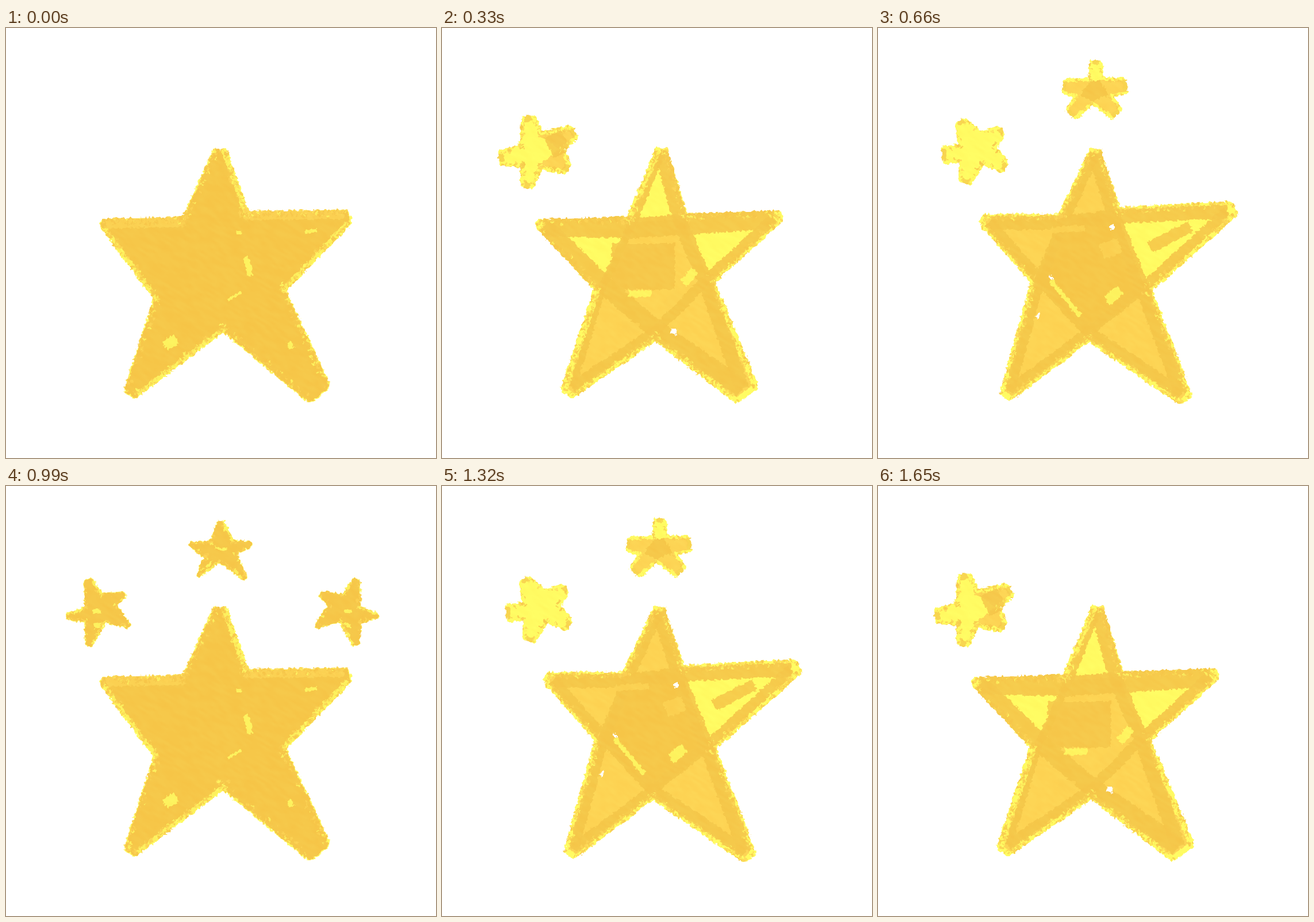
Animation, 748 px wide and 748 px high, one loop 1.98 s. Source, as an HTML page with a canvas:

```html
<!DOCTYPE html>
<html lang="en">
<head>
<meta charset="utf-8">
<title>Crayon stars</title>
<style>
html, body { margin: 0; width: 100%; height: 100%; overflow: hidden; background: #fff; }
canvas { display: block; width: 100vmin; height: 100vmin; }
</style>
</head>
<body>
<canvas id="stage" width="748" height="748"></canvas>
<script>
const start = performance.now();
const SIZE = 748, HOLD = 330, MIRROR = 753;
const YELLOW = '#fffb62', AMBER = '#fdd454', GOLD = '#f6c749', WHITE = '#fff';
const ORDER = [0, 1, 2, 3, 2, 1];

let seed = 1;
function rnd() {
  seed = (seed * 1664525 + 1013904223) >>> 0;
  return seed / 4294967296;
}

// Smooth value noise in -1..1 on a wrapped lattice
function makeNoise(cw, ch = cw) {
  const grid = Float32Array.from({ length: 65536 }, () => rnd() * 2 - 1);
  const at = (a, b) => grid[((b & 255) << 8) | (a & 255)];
  return (x, y) => {
    x /= cw; y /= ch;
    const i = Math.floor(x), j = Math.floor(y), u = x - i, v = y - j;
    const top = at(i, j) + (at(i + 1, j) - at(i, j)) * u;
    const low = at(i, j + 1) + (at(i + 1, j + 1) - at(i, j + 1)) * u;
    return top + (low - top) * v;
  };
}
const shiftX = makeNoise(3), shiftY = makeNoise(3), streak = makeNoise(14, 5);

let g;

function trace(pts) {
  g.beginPath();
  pts.forEach(p => g.lineTo(p[0], p[1]));
}
function area(pts, color, alpha = 1) {
  g.globalAlpha = alpha;
  g.fillStyle = color;
  trace(pts);
  g.fill();
}
function line(pts, width, color, alpha = 1) {
  g.globalAlpha = alpha;
  g.strokeStyle = color;
  g.lineWidth = width;
  trace(pts);
  g.stroke();
}
function blob(pts, grow, color) {
  area(pts.concat([pts[0]]), color);
  line(pts.concat([pts[0], pts[1]]), grow * 2, color);
}
function mark([x, y, length, width, deg], color, alpha) {
  const a = deg * Math.PI / 180, dx = Math.cos(a) * length / 2, dy = Math.sin(a) * length / 2;
  line([[x - dx, y - dy], [x + dx, y + dy]], width, color, alpha);
}

const toward = (p, q, d) => {
  const n = Math.hypot(q[0] - p[0], q[1] - p[1]);
  return [p[0] + (q[0] - p[0]) * d / n, p[1] + (q[1] - p[1]) * d / n];
};

// Tips [x, y, half width] and dents run clockwise from the top; r rounds every corner
function shape(r, tips, dents) {
  const mid = [0, 1].map(k => dents.reduce((sum, p) => sum + p[k], 0) / 5);
  const ends = tips.map(([x, y, w = 0]) => {
    const n = Math.hypot(x - mid[0], y - mid[1]);
    const px = (mid[1] - y) / n * w, py = (x - mid[0]) / n * w;
    return [[x - px, y - py], [x + px, y + py]];
  });
  const sides = ends.flatMap((e, i) => [[e[1], dents[i]], [dents[i], ends[(i + 1) % 5][0]]]);
  return { r, tips, dents, mid, ends, sides, outline: ends.flatMap((e, i) => [...e, dents[i]]) };
}

// Point on one side, moved outwards by d
function rim([a, b], t, d) {
  const dx = b[0] - a[0], dy = b[1] - a[1], n = Math.hypot(dx, dy);
  return [a[0] + dx * t + dy / n * d, a[1] + dy * t - dx / n * d];
}

function grains(s, density) {
  g.globalAlpha = 0.75;
  for (const side of s.sides) {
    const n = Math.hypot(side[1][0] - side[0][0], side[1][1] - side[0][1]) * density;
    for (let k = 0; k < n; k++) {
      const [x, y] = rim(side, rnd() * 1.1 - 0.05, s.r * (1.1 - rnd() * 1.2));
      const pick = rnd(), size = 0.7 + rnd() * 1.6;
      g.fillStyle = pick < 0.6 ? GOLD : pick < 0.85 ? AMBER : YELLOW;
      g.beginPath();
      g.ellipse(x, y, size * 1.4, size, rnd() * 3, 0, 7);
      g.fill();
    }
  }
}

function crayon(s, { skin, core, arms = [], chords = [], edges = [], marks = [], holes = [], dab = 0, grit = 0.8 }) {
  g.globalCompositeOperation = 'source-over';
  blob(s.outline, s.r, YELLOW);
  g.globalCompositeOperation = 'source-atop';
  if (skin) blob(s.outline, s.r - skin, GOLD);
  arms.forEach((color, i) => color && area([s.dents[(i + 4) % 5], ...s.ends[i], s.dents[i]], color));
  if (core) area(s.dents, core);
  // Each chord joins a tip to the next but one, past two dents
  chords.forEach((width, i) => {
    const a = s.tips[i], b = s.tips[(i + 2) % 5];
    const path = [toward(a, s.mid, s.r * 0.6), toward(s.dents[i], s.mid, width * 0.3),
      toward(s.dents[(i + 1) % 5], s.mid, width * 0.3), toward(b, s.mid, s.r * 0.6)];
    line(path, width, GOLD, 0.9);
  });
  edges.forEach(([i, width, color]) => line([0, 1].map(t => rim(s.sides[i], t, s.r * 0.6)), width, color, 0.8));
  marks.forEach(([color, ...m]) => mark(m, color, 0.85));
  if (dab) s.ends.forEach(e => line(e.map(p => toward(p, s.mid, -s.r * 0.5)), dab, GOLD, 0.7));
  grains(s, grit);
  holes.forEach(m => mark(m, WHITE, 1));
}

// Ragged contours and faint wax streaks
function roughen() {
  const src = g.getImageData(0, 0, SIZE, SIZE), out = g.createImageData(SIZE, SIZE);
  const a = src.data, b = out.data;
  const clamp = v => Math.max(0, Math.min(SIZE - 1, Math.round(v)));
  for (let y = 0, o = 0; y < SIZE; y++) {
    for (let x = 0; x < SIZE; x++, o += 4) {
      const i = (clamp(y + shiftY(x, y) * 2.4) * SIZE + clamp(x + shiftX(x, y) * 2.4)) * 4;
      const tint = a[i + 2] < 200 ? streak(x + y * 0.6, y - x * 0.6) * 3 : 0;
      b[o] = a[i];
      b[o + 1] = a[i + 1] + tint;
      b[o + 2] = a[i + 2] + tint;
      b[o + 3] = 255;
    }
  }
  g.putImageData(out, 0, 0);
}

function scene(...parts) {
  const c = document.createElement('canvas');
  c.width = c.height = SIZE;
  g = c.getContext('2d', { willReadFrequently: true });
  g.lineJoin = 'round';
  parts.forEach(draw => draw());
  g.globalCompositeOperation = 'destination-over';
  g.globalAlpha = 1;
  g.fillStyle = WHITE;
  g.fillRect(0, 0, SIZE, SIZE);
  roughen();
  return c;
}

const solidStar = () => crayon(shape(11,
  [[373, 212], [589, 331, 5], [541, 631, 15], [220, 631, 4], [174, 342]],
  [[414, 329], [475, 455], [378, 516], [268, 469], [313, 339]]), {
  skin: 2,
  edges: [[0, 12, YELLOW], [1, 24, AMBER], [2, 11, YELLOW], [5, 9, YELLOW], [7, 8, YELLOW], [8, 26, AMBER]],
  marks: [[YELLOW, 405, 356, 9, 8, 0], [YELLOW, 530, 354, 20, 6, -8], [YELLOW, 421, 414, 34, 9, 75],
    [YELLOW, 398, 466, 28, 4, -30], [YELLOW, 286, 547, 24, 18, -30], [YELLOW, 495, 552, 14, 8, 60]]
});

const bandedStar = () => crayon(shape(10,
  [[382, 210], [583, 329, 2], [526, 632, 17], [222, 630, 6], [172, 342]],
  [[419, 333], [464, 440], [371, 533], [275, 452], [328, 338]]), {
  core: AMBER,
  arms: [0, 0, AMBER, AMBER, 0],
  chords: [25, 18, 32, 14, 36],
  edges: [[6, 16, YELLOW], [9, 12, YELLOW]],
  marks: [[GOLD, 350, 415, 110, 80, 0], [YELLOW, 344, 462, 40, 11, 0], [YELLOW, 430, 433, 30, 15, -50],
    [AMBER, 402, 472, 36, 18, -45], [AMBER, 328, 520, 30, 18, 10]],
  holes: [[403, 528, 12, 10, 20]]
});

const outlinedStar = () => crayon(shape(10,
  [[378, 212], [613, 317, 6], [531, 641, 6], [226, 636, 4], [188, 336, 3]],
  [[414, 322], [466, 454], [366, 534], [276, 440], [320, 333]]), {
  core: GOLD,
  arms: [AMBER, 0, AMBER, AMBER, AMBER],
  chords: [24, 18, 20, 18, 24],
  marks: [[GOLD, 508, 364, 80, 20, -27], [AMBER, 405, 384, 34, 26, -20], [YELLOW, 410, 465, 30, 18, -40],
    [YELLOW, 326, 470, 80, 8, 50], [AMBER, 330, 350, 60, 10, -4]],
  holes: [[407, 346, 8, 8, 0], [302, 434, 8, 4, 40], [279, 500, 12, 3, -60]]
});

const paleLeft = () => crayon(shape(8,
  [[151, 160, 6], [225, 183, 7], [214, 241, 6], [149, 271, 5], [106, 225, 6]],
  [[170, 188], [205, 210], [168, 238], [143, 236], [142, 208]]), {
  arms: [0, AMBER, AMBER, 0, 0],
  marks: [[GOLD, 200, 202, 32, 40, -25]],
  dab: 12, grit: 0.6
});

const tippedLeft = () => crayon(shape(7,
  [[146, 166, 5], [211, 181, 5], [217, 239, 6], [153, 264, 6], [118, 220, 9]],
  [[178, 187], [199, 208], [180, 230], [147, 228], [146, 209]]), { dab: 9, grit: 0.25 });

const chunkyTop = () => crayon(shape(6,
  [[379, 62, 6], [427, 101, 9], [412, 147, 8], [338, 147, 8], [327, 102, 8]],
  [[387, 92], [402, 117], [373, 127], [350, 117], [371, 92]]), {
  arms: [0, AMBER, AMBER, AMBER, AMBER],
  core: GOLD, dab: 7, grit: 0.3
});

const slimTop = () => crayon(shape(6,
  [[374, 61], [423, 102], [414, 158], [337, 153], [323, 102]],
  [[391, 99], [395, 117], [370, 127], [352, 122], [358, 102]]), {
  skin: 1,
  edges: [[0, 4, YELLOW], [5, 4, YELLOW], [8, 4, AMBER]],
  marks: [[YELLOW, 373, 109, 22, 4, 8], [YELLOW, 353, 136, 14, 4, 130]],
  grit: 0.4
});

const slimSide = () => crayon(shape(6,
  [[144, 166, 3], [202, 189, 1], [211, 242], [145, 273, 2], [109, 226]],
  [[164, 193], [187, 208], [170, 232], [141, 234], [142, 214]]), {
  skin: 1,
  edges: [[0, 4, YELLOW], [5, 5, YELLOW], [8, 4, YELLOW]],
  marks: [[YELLOW, 158, 218, 14, 6, -5], [YELLOW, 160, 242, 14, 8, -20]],
  grit: 0.4
});

function flipped(draw) {
  g.save();
  g.translate(MIRROR, 0);
  g.scale(-1, 1);
  draw();
  g.restore();
}

const scenes = [
  scene(solidStar),
  scene(bandedStar, paleLeft),
  scene(outlinedStar, tippedLeft, chunkyTop),
  scene(solidStar, slimTop, slimSide, () => flipped(slimSide))
];

const view = document.getElementById('stage').getContext('2d');
function tick() {
  const step = Math.floor((performance.now() - start) / HOLD) % ORDER.length;
  view.drawImage(scenes[ORDER[step]], 0, 0);
  requestAnimationFrame(tick);
}
tick();
</script>
</body>
</html>
```
